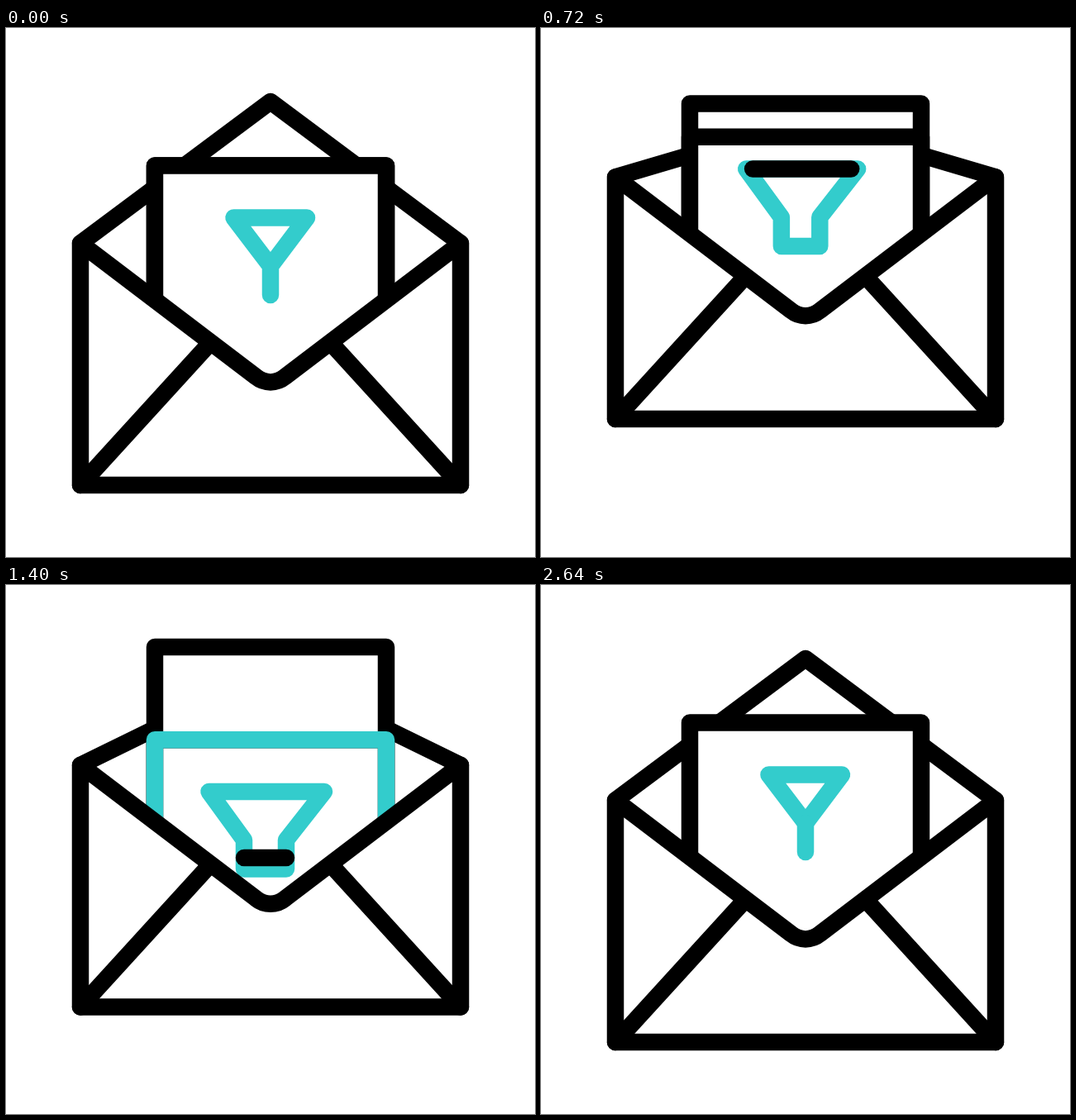
Write an HTML page with a canvas that moves like this. It is 640x640 px and loops after 2.8 s.

```html
<!DOCTYPE html>
<html lang="en">
<head>
<meta charset="utf-8">
<title>Mail filter</title>
<style>
  html, body { margin: 0; width: 100%; height: 100%; overflow: hidden; background: #fff; }
  canvas { display: block; width: 640px; height: 640px; }
</style>
</head>
<body>
<canvas id="stage" width="640" height="640"></canvas>
<script>
const ctx = document.getElementById('stage').getContext('2d');
const LOOP = 2800, STEP = 40;
const BLACK = '#000', TEAL = '#33cccc', WHITE = '#fff';
const PAPER_TOP = 166.4, FUNNEL_TOP = 229.5, NECK = 58.5, SPOUT = 93.5, DROP = 25.5;

const mix = (a, b, k) => a + (b - a) * k;

// Cubic timing curve with handles (.5, 0) and (.18, 1)
function ease(u) {
  if (u <= 0) return 0;
  if (u >= 1) return 1;
  const curve = (s, a, b) => 3 * (1 - s) * (1 - s) * s * a + 3 * (1 - s) * s * s * b + s * s * s;
  let lo = 0, hi = 1;
  for (let i = 0; i < 24; i++) {
    const mid = (lo + hi) / 2;
    if (curve(mid, 0.5, 0.18) < u) lo = mid; else hi = mid;
  }
  return curve(lo, 0, 1);
}

const phase = (t, start, duration) => ease((t - start) / duration);

function trace(points, closed) {
  ctx.beginPath();
  points.forEach(([x, y]) => ctx.lineTo(x, y));
  if (closed) ctx.closePath();
}

function line(points, color, closed = false) {
  trace(points, closed);
  ctx.strokeStyle = color;
  ctx.stroke();
}

// Strokes the part of a polyline between two fractions of its length
function trimmed(points, from, to, color) {
  const lengths = points.slice(1).map(([x, y], i) => Math.hypot(x - points[i][0], y - points[i][1]));
  const total = lengths.reduce((a, b) => a + b, 0);
  const part = [];
  let walked = 0;
  lengths.forEach((len, i) => {
    const a = Math.max(0, (from * total - walked) / len);
    const b = Math.min(1, (to * total - walked) / len);
    if (a < b) {
      for (const k of [a, b]) {
        part.push([mix(points[i][0], points[i + 1][0], k), mix(points[i][1], points[i + 1][1], k)]);
      }
    }
    walked += len;
  });
  if (part.length) line(part, color);
}

function paper(top, bottom, tealPart) {
  const outline = [[180, bottom], [180, top], [460, top], [460, bottom]];
  trace(outline, true);
  ctx.fillStyle = WHITE;
  ctx.fill();
  line(outline, BLACK);
  if (tealPart > 0) trimmed(outline, 0, tealPart, TEAL);
}

function wideFunnel(t, top) {
  const wide = phase(t, 200, 800);
  const left = mix(275.5, 245.5, wide), right = mix(364, 385, wide);
  const neckLeft = mix(320, 288, wide), neckRight = mix(320, 339, wide);
  line([
    [left, top], [right, top], [neckRight, top + NECK],
    [neckRight, top + SPOUT], [neckLeft, top + SPOUT], [neckLeft, top + NECK]
  ], TEAL, true);

  const grow = phase(t, 280, 720);
  if (grow > 0) {
    const sink = SPOUT * phase(t, 1000, 690);
    const k = Math.min(1, sink / NECK);
    const a = mix(left, neckLeft, k), b = mix(right, neckRight, k);
    const mid = (a + b) / 2, half = (b - a) / 2 * grow;
    line([[mid - half, top + sink], [mid + half, top + sink]], BLACK);
  }
}

function newFunnel(t, lift) {
  const drawn = phase(t, 1460, 660);
  if (drawn <= 0) return;
  const top = FUNNEL_TOP + lift + DROP * (1 - phase(t, 2090, 500));
  const tip = [320, top + NECK];
  const triangle = [[364, top], [275.5, top], tip];
  if (drawn < 1) {
    const origin = 0.583;
    trimmed([...triangle, triangle[0]], origin * (1 - drawn), mix(origin, 1, drawn), TEAL);
  } else {
    line(triangle, TEAL, true);
  }
  const stem = phase(t, 2150, 510);
  if (stem > 0) line([tip, [320, tip[1] + (SPOUT - NECK) * stem]], TEAL);
}

function envelopeFront(rise) {
  ctx.save();
  ctx.translate(0, -rise);
  ctx.strokeStyle = BLACK;
  ctx.fillStyle = WHITE;
  ctx.beginPath();
  ctx.moveTo(90, 260.5);
  ctx.lineTo(302.5, 422);
  ctx.bezierCurveTo(313, 430.5, 327, 430.5, 337.5, 422);
  ctx.lineTo(550, 260.5);
  ctx.lineTo(550, 553);
  ctx.lineTo(90, 553);
  ctx.closePath();
  ctx.fill();
  ctx.stroke();
  line([[90, 553], [247, 381]], BLACK);
  line([[550, 553], [393, 381]], BLACK);
  ctx.restore();
}

function draw(t) {
  ctx.fillStyle = WHITE;
  ctx.fillRect(0, 0, 640, 640);
  ctx.lineWidth = 20.5;
  ctx.lineCap = ctx.lineJoin = 'round';

  const up = phase(t, 400, 680);
  const envelopeDown = phase(t, 1100, 726);
  const rise = 104 * (phase(t, 355, 720) - envelopeDown);
  const fold = 144 * (phase(t, 395, 685) - envelopeDown);
  const backLift = -105 * (up - phase(t, 1240, 680));
  const frontLift = -48.6 * up + 318 * phase(t, 1205, 690);
  const bottom = 480 - rise;

  const shoulder = 260.5 - rise;
  line([[90, shoulder], [320, shoulder - 171.5 + fold], [550, shoulder]], BLACK);

  // Everything in the pocket stays above the lower edge of the envelope
  ctx.save();
  ctx.beginPath();
  ctx.rect(0, 0, 640, bottom + 20);
  ctx.clip();
  paper(PAPER_TOP + backLift, bottom, 0);
  newFunnel(t, backLift);
  if (t < 1900) {
    paper(PAPER_TOP + frontLift, bottom, phase(t, 640, 650));
    const extra = phase(t, 100, 830) - phase(t, 1000, 480);
    wideFunnel(t, FUNNEL_TOP + frontLift - DROP * extra);
  }
  ctx.restore();

  envelopeFront(rise);
}

const began = performance.now();
function tick() {
  const t = (performance.now() - began) % LOOP;
  draw(Math.floor(t / STEP) * STEP);
  requestAnimationFrame(tick);
}
tick();
</script>
</body>
</html>
```
